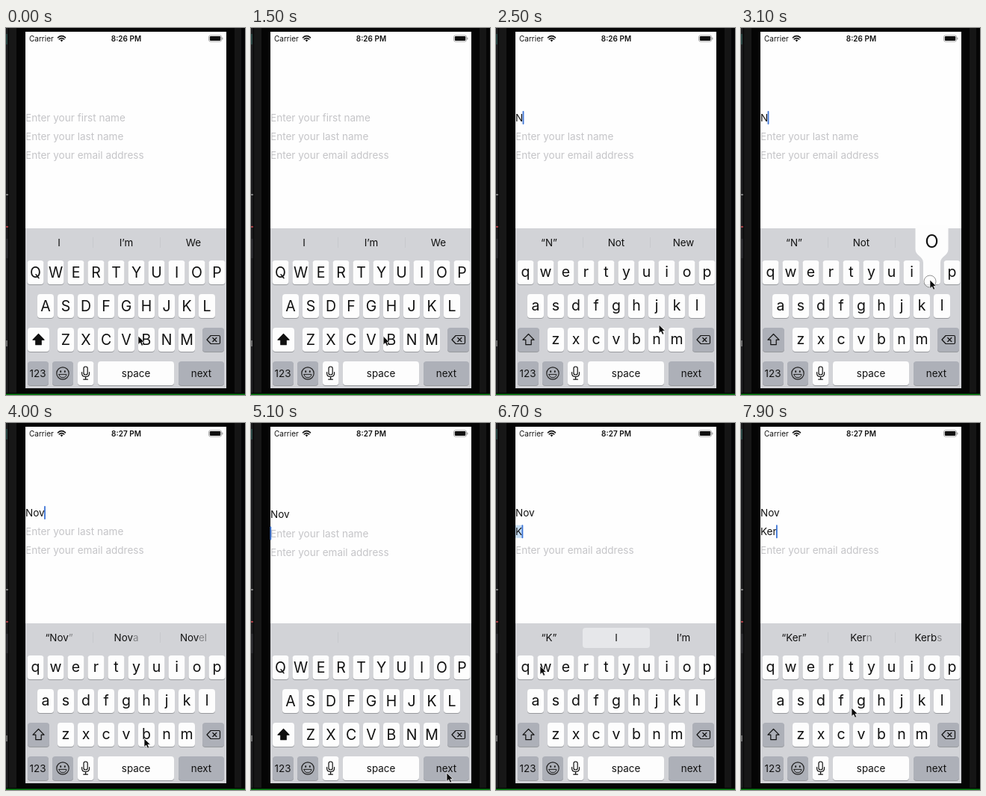
An HTML page for the animation above (8 s loop, 320x491 px).

```html
<!DOCTYPE html>
<html lang="en">
<head>
<meta charset="utf-8">
<title>Form keyboard</title>
<style>
  html, body { margin: 0; width: 100%; height: 100%; overflow: hidden; background: #050505; }
  svg { display: block; width: 100%; height: 100%; }
  text { font-family: Inter, "Liberation Sans", sans-serif; fill: #111; }
  .mid { text-anchor: middle; }
  .letter { font-size: 19.5px; }
  .label { font-size: 13.4px; }
  .field { font-size: 13.55px; }
</style>
</head>
<body>
<svg id="stage" viewBox="0 0 320 491" xmlns="http://www.w3.org/2000/svg"></svg>
<script>
const LOOP = 8000, STEP = 100;
const stage = document.getElementById('stage');

function add(tag, attrs = {}, text = '', parent = stage) {
  const el = document.createElementNS('http://www.w3.org/2000/svg', tag);
  set(el, attrs);
  if (text) el.textContent = text;
  parent.appendChild(el);
  return el;
}
function set(el, attrs) {
  for (const name in attrs) el.setAttribute(name, attrs[name]);
}
const rect = (x, y, width, height, fill, rx = 0) => add('rect', { x, y, width, height, fill, rx });
const line = (d, width = 1.2, stroke = '#111') =>
  add('path', { d, fill: 'none', stroke, 'stroke-width': width, 'stroke-linecap': 'round', 'stroke-linejoin': 'round' });
const centered = (x, y, text, cls = 'label') => add('text', { x, y, class: 'mid ' + cls }, text);

const GREY = '#adb0b8', WHITE = '#fdfdfd';
function keycap(x, y, width, fill = WHITE) {
  rect(x, y + 1, width, 32, '#97999d', 4);
  return rect(x, y, width, 32, fill, 4);
}

// Device and screen
rect(0, 0, 320, 491, '#050505');
rect(0, 0, 3, 488, '#1b1b1d');
rect(4, 0, 10, 488, '#171717');
rect(306, 0, 9, 488, '#151515');
rect(0, 8, 2, 14, '#24423f');
rect(0, 222, 3, 2, '#777');
rect(0, 265, 3, 2, '#a33c42');
rect(0, 282, 3, 26, '#2b2b2e');
rect(0, 418, 2, 8, '#666');
rect(0, 489.5, 320, 1.5, '#0a8414');
rect(26, 5, 269, 477, '#fefefe');

// Status bar
add('text', { x: 31, y: 17.5, 'font-size': 10 }, 'Carrier');
const clock = add('text', { x: 161, y: 17.5, class: 'mid', 'font-size': 10, 'font-weight': 600 });
line('M69.5 12.8Q74.5 8.6 79.5 12.8M71.3 14.9Q74.5 12.2 77.7 14.9', 1.6);
add('path', { d: 'M72.6 16.2Q74.5 14.8 76.4 16.2L74.5 18.4Z', fill: '#111' });
add('rect', { x: 271.5, y: 9.8, width: 17, height: 8.4, rx: 2.2, fill: 'none', stroke: '#999', 'stroke-width': 0.8 });
rect(272.8, 11, 14.5, 6, '#111', 1.2);
rect(289.2, 12.4, 1.2, 3.2, '#999', 0.6);

// Form fields
const selection = rect(26, 137, 9, 17, '#c5dcf4');
const placeholders = ['Enter your first name', 'Enter your last name', 'Enter your email address'];
const fields = placeholders.map(() => add('text', { x: 26, class: 'field' }));
const caret = rect(0, 0, 1.8, 18, '#3c74d6', 0.8);

// Suggestions
rect(26, 268, 269, 214, '#d2d3d7');
const highlight = rect(116, 274, 90, 27, '#e6e7ea', 4);
const dividers = [116, 206].map(x => rect(x, 280, 0.8, 14, '#c5c7cb'));
const suggestions = [71, 161, 251].map(x => {
  const el = centered(x, 292, '');
  return { solid: add('tspan', {}, '', el), faded: add('tspan', { 'fill-opacity': 0.4 }, '', el) };
});

// Keys
const keys = {};
[['QWERTYUIOP', 39.5, 311], ['ASDFGHJKL', 53, 356], ['ZXCVBNM', 80, 401]].forEach(([row, left, y]) =>
  [...row].forEach((name, i) => {
    const x = left + 27 * i;
    keycap(x - 11, y, 22);
    keys[name] = { x, y, label: centered(x, y + 23, name, 'letter') };
  }));

const shiftKey = keycap(29, 401, 29);
const shiftArrow = add('path', {
  d: 'M43.5 409.5L51 417.2H47.2V423.7H39.8V417.2H36Z', stroke: '#111', 'stroke-width': 1.2, 'stroke-linejoin': 'round'
});
keycap(263, 401, 29, GREY);
line('M269 417L274.2 411.5H285Q286.5 411.5 286.5 413V421Q286.5 422.5 285 422.5H274.2ZM276.8 414.5L281.8 419.5M281.8 414.5L276.8 419.5');

keycap(29, 446, 28, GREY);
keycap(62, 446, 28, GREY);
keycap(96, 446, 21.5);
keycap(123, 446, 102);
const nextKey = keycap(231, 446, 61, GREY);
centered(42.5, 467, '123');
centered(174, 466.5, 'space');
centered(261.5, 466.5, 'next');
add('circle', { cx: 76, cy: 462, r: 8.2, fill: 'none', stroke: '#222', 'stroke-width': 1.2 });
line('M71 463.4H81Q80.3 467.8 76 467.8T71 463.4Z', 1, '#222');
add('ellipse', { cx: 73.2, cy: 459.5, rx: 1, ry: 1.5, fill: '#222' });
add('ellipse', { cx: 78.8, cy: 459.5, rx: 1, ry: 1.5, fill: '#222' });
add('rect', { x: 104, y: 453, width: 5.2, height: 11, rx: 2.6, fill: 'none', stroke: '#111', 'stroke-width': 1.2 });
line('M101.6 460.5V462Q101.6 466.6 106.6 466.6T111.6 462V460.5M106.6 466.6V470M103.8 470.2H109.4');

// Key balloon and pointer
const balloon = add('g');
add('path', {
  d: 'M-18 -47h36q4 0 4 4v28c0 9-10.5 9-10.5 18v25q0 4-4 4h-15q-4 0-4-4v-25c0-9-10.5-9-10.5-18v-28q0-4 4-4z',
  fill: WHITE
}, '', balloon);
const balloonLetter = add('text', { y: -17.5, class: 'mid', 'font-size': 32, 'font-weight': 300 }, '', balloon);

const pointer = add('g');
const ring = add('circle', { cy: 2, r: 8, fill: '#fff', 'fill-opacity': 0.65, stroke: '#777', 'stroke-width': 0.8 }, '', pointer);
add('path', {
  d: 'M0 0V11.5L2.7 9.1L4.6 13.2L6.7 12.2L4.9 8.3H8.4Z', fill: '#0b0b0b', stroke: '#fff', 'stroke-width': 0.7
}, '', pointer);

// Timelines: [start, value...]
const path = [
  [0, 177, 412], [1400, 177, 412], [2000, 179, 416], [2100, 206, 418], [2300, 206, 418],
  [2900, 253, 337], [3200, 253, 337], [3600, 164, 419], [3800, 164, 419], [4000, 185, 422],
  [4300, 187, 424], [4800, 262, 468], [5200, 262, 468], [5800, 243, 376], [6300, 243, 376],
  [6700, 59, 325], [6900, 92, 329], [7200, 92, 329], [7400, 119, 329], [7700, 119, 329], [7900, 148, 381]
];
const presses = [[2100, 2200, 'N'], [3000, 3200, 'O'], [3700, 3800, 'V'], [4900, 5000, 'next'],
  [6000, 6300, 'K'], [7000, 7100, 'E'], [7500, 7700, 'R']];
const firstName = [[0, ''], [2200, 'N'], [3200, 'No'], [3800, 'Nov']];
const lastName = [[0, ''], [6300, 'K'], [7100, 'Ke'], [7700, 'Ker']];
const hints = [
  [0, 'I', 'I’m', 'We'], [2200, '“N”', 'Not', 'New'], [3200, '“No”', 'Not', 'Now'],
  [3900, '“Nov|”', 'Nov|a', 'Nov|el'], [4100, '“Nov”', 'Nova', 'Novel'], [5000, '', '', ''],
  [5300, 'I', 'I’m', 'We'], [6300, '“K”', 'I', 'I’m'], [7100, '“Ke”', 'Key', 'Keep'],
  [7800, '“Ker”', 'Ker|n', 'Kerb|s']
];
const offsets = [[0, 0], [5100, 2.3], [5200, 1], [5300, 0]];

const within = (t, from, to) => t >= from && t < to;
const show = (el, on) => el.setAttribute('visibility', on ? 'visible' : 'hidden');
const current = (track, t) => track.filter(entry => entry[0] <= t).pop();

function pointerAt(t) {
  const i = path.findIndex(p => p[0] > t);
  if (i < 0) return path[path.length - 1].slice(1);
  const [t0, x0, y0] = path[i - 1], [t1, x1, y1] = path[i];
  const u = (t - t0) / (t1 - t0), k = u * u * (3 - 2 * u);
  return [x0 + (x1 - x0) * k, y0 + (y1 - y0) * k];
}

function drawForm(t) {
  const dy = current(offsets, t)[1];
  const values = [current(firstName, t)[1], current(lastName, t)[1], ''];
  fields.forEach((el, i) => {
    el.textContent = values[i] || placeholders[i];
    set(el, { y: 125 + 25.2 * i + dy });
    el.style.fill = values[i] ? '#111' : '#c5c5c8';
  });
  const active = t < 5000 ? 0 : 1;
  const width = values[active] ? fields[active].getComputedTextLength() : 0;
  const top = 111 + 25.2 * active + dy;
  set(caret, { x: 25.4 + width, y: top });
  show(caret, t >= 2200 && !within(t, 5700, 6000));
  set(selection, { y: top + 0.5, width });
  show(selection, within(t, 6400, 7100));
}

function drawKeyboard(t) {
  const upper = t < 2200 || within(t, 5000, 6300);
  for (const name in keys) {
    const { y, label } = keys[name];
    label.textContent = upper ? name : name.toLowerCase();
    set(label, { y: y + (upper ? 23 : 21.8) });
  }
  set(shiftKey, { fill: upper ? WHITE : GREY });
  set(shiftArrow, { fill: upper ? '#111' : 'none' });

  current(hints, t).slice(1).forEach((hint, i) => {
    const [solid, faded = ''] = hint.split('|');
    suggestions[i].solid.textContent = solid;
    suggestions[i].faded.textContent = faded;
  });
  const marked = within(t, 6400, 7100);
  show(highlight, marked);
  show(dividers[0], !marked);
  show(dividers[1], !marked && !within(t, 5000, 5300));

  const press = presses.find(p => within(t, p[0], p[1]));
  const key = press && keys[press[2]];
  set(nextKey, { fill: press && !key ? WHITE : GREY });
  show(ring, press);
  show(balloon, key);
  if (key) {
    set(balloon, { transform: `translate(${key.x} ${key.y})` });
    balloonLetter.textContent = key.label.textContent;
  }
}

function render(now) {
  const t = Math.floor(now % LOOP / STEP) * STEP;
  clock.textContent = t < 3200 ? '8:26 PM' : '8:27 PM';
  drawForm(t);
  drawKeyboard(t);
  set(pointer, { transform: `translate(${pointerAt(t)})` });
}

const start = performance.now();
function frame() {
  render(performance.now() - start);
  requestAnimationFrame(frame);
}
frame();
</script>
</body>
</html>
```
